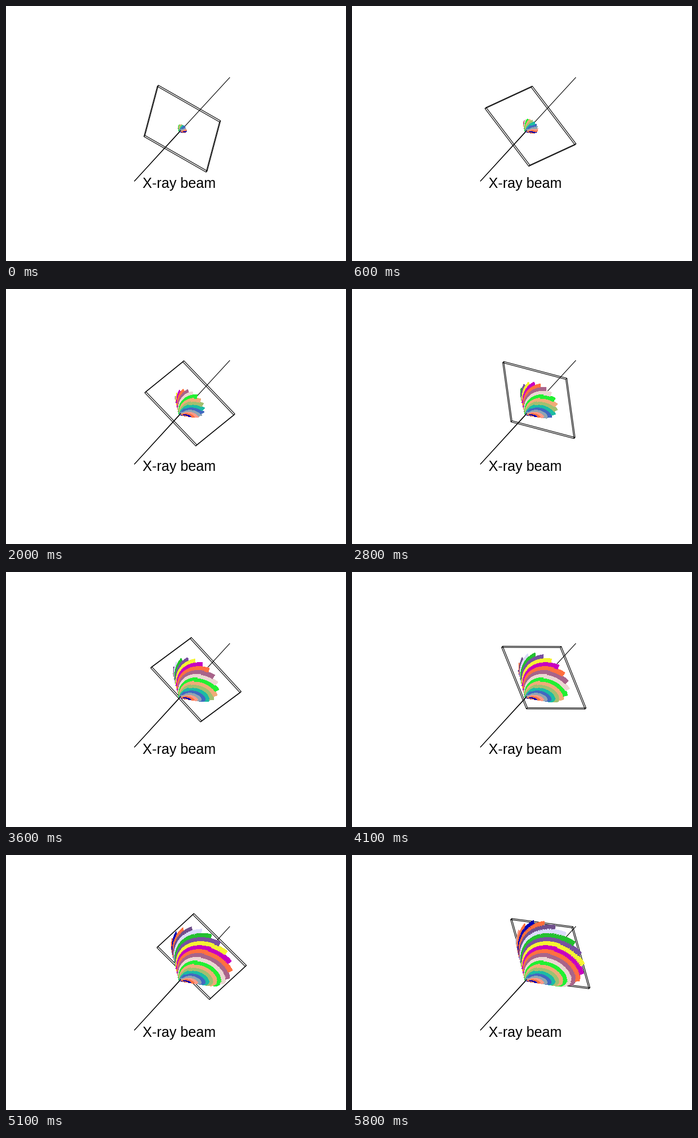
A matplotlib script for the animation above (5900 ms loop, 600 by 450 pixels).

```python
import numpy as np
import matplotlib.pyplot as plt
from matplotlib.animation import FuncAnimation
from matplotlib.collections import LineCollection, PolyCollection

W, H, DPI = 600, 450, 100
FRAMES = 59
LEAD = 7                              # steps the cone has already grown at the start

APEX = np.array([306.3, 221.6])
AXIS = np.array([0.676, -0.737])      # beam direction on screen
SIDE = np.array([0.737, 0.676])
TILT = 0.659                          # foreshortening of circles around the beam
SPEED = 0.993                         # pixels along the beam per step
TIP, GROWTH = 1.2, 1.06               # cone radius at the apex and gain per step
PLATE_R, PLATE_START, PLATE_SPIN = 92.2, np.radians(154), -0.1
SWIRL_START, SWIRL = np.radians(18.6), np.radians(3.93)
SLANT = 1.7                           # distance along the cone surface per step

COLORS = ["#0000b4", "#ff7043", "#fa9a88", "#8fa5b4", "#4169c0", "#1cbca4",
          "#a0c070", "#f0ac78", "#22f032", "#ecd6d2", "#a8648a", "#ff7040",
          "#c800c0", "#f4f432", "#7850a0", "#24c030", "#dcdcfc", "#70508c",
          "#ff6e3c"]
GAP = 2 * np.pi / len(COLORS)


def ring_point(step, radius, angle):
    """Screen point on a circle around the beam, `step` steps past the apex."""
    return (APEX + AXIS * (SPEED * step + radius * TILT * np.sin(angle))
            + SIDE * radius * np.cos(angle))


def cone_radius(step):
    return TIP + GROWTH * step


def arm_angle(k, step):
    return SWIRL_START + k * GAP - SWIRL * (step - LEAD)


def arm(k, step):
    step = max(step, 0)
    return ring_point(step, cone_radius(step), arm_angle(k, step))


def lag(step):
    """Steps to go back on the inner arm so that a ribbon is cut square."""
    t = (cone_radius(step) * SWIRL) ** 2
    return GAP / SWIRL * t / (t + SLANT ** 2)


def build_ribbons():
    quads = []
    for k, color in enumerate(COLORS):
        for s in range(FRAMES - 1 + LEAD):
            e = s + 1
            shape = [arm(k, s), arm(k, e),
                     arm(k - 1, e - lag(e)), arm(k - 1, s - lag(s))]
            depth = np.sin(arm_angle(k - 0.5, s + 0.5 - lag(s) / 2))
            quads.append((depth, s, shape, color))
    return sorted(quads, key=lambda q: q[0])


def plate_lines(n):
    angles = PLATE_START + PLATE_SPIN * n + np.arange(5) * np.pi / 2
    mid = np.array([ring_point(n + LEAD, PLATE_R, a) for a in angles])
    near, far = mid - 1.4 * AXIS, mid + 1.4 * AXIS
    return [near, far] + [np.array(p) for p in zip(near[:4], far[:4])]


fig = plt.figure(figsize=(W / DPI, H / DPI), dpi=DPI, facecolor="white")
ax = fig.add_axes([0, 0, 1, 1])
ax.set_xlim(0, W)
ax.set_ylim(H, 0)
ax.axis("off")

LINE = dict(color="black", lw=0.8)
ax.plot([226.8, 394.7], [308.9, 126.3], zorder=1, **LINE)
ax.plot([226.8, APEX[0] + 2], [308.9, APEX[1] - 2.2], zorder=4, **LINE)
plate = LineCollection([], colors="black", linewidths=0.8, zorder=2)
cone = PolyCollection([], linewidths=0.3, antialiaseds=False, zorder=3)
ax.add_collection(plate, autolim=False)
ax.add_collection(cone, autolim=False)
ax.text(241.2, 321.5, "X-ray beam", family="Liberation Sans", size=18,
        color="black", va="baseline", zorder=5)

ribbons = build_ribbons()


def draw(n):
    shown = [q for q in ribbons if q[1] < n + LEAD]
    cone.set_verts([q[2] for q in shown])
    cone.set_color([q[3] for q in shown])
    plate.set_segments(plate_lines(n))
    return plate, cone


anim = FuncAnimation(fig, draw, frames=FRAMES, interval=100, repeat=True,
                     repeat_delay=0, blit=False)
plt.show()
```
